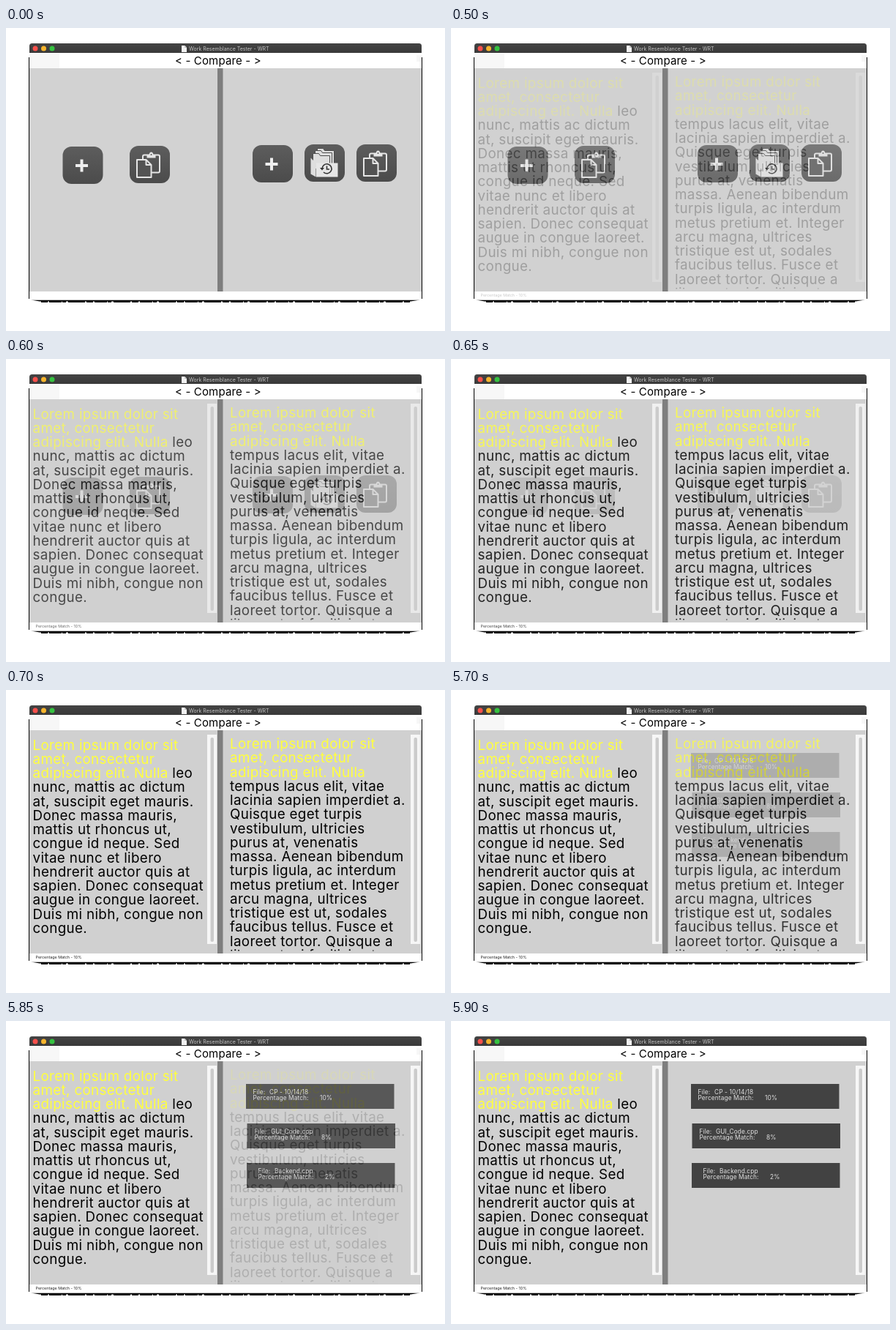
Animation, 600 px wide and 414 px high, one loop 8 s. Source, as an HTML page:

```html
<!DOCTYPE html>
<html lang="en">
<head>
<meta charset="utf-8">
<title>Compare</title>
<style>
html, body { margin: 0; width: 100%; height: 100%; overflow: hidden; background: #fff; }
svg { display: block; width: 600px; height: 414px; }
text { font-family: Inter, "Liberation Sans", Arial, sans-serif; white-space: pre; }
.body { font-size: 18.8px; letter-spacing: .35px; }
.card { font-size: 8.3px; letter-spacing: .12px; fill: #e2e2e2; }
.line { fill: none; stroke: #e6e6e6; stroke-width: 2; stroke-linejoin: round; }
.sheet { fill: #535353; }
</style>
</head>
<body>
<svg viewBox="0 0 600 414">
  <defs>
    <linearGradient id="button" x2="0" y2="1">
      <stop offset="0" stop-color="#5d5d5d"/>
      <stop offset="1" stop-color="#4b4b4b"/>
    </linearGradient>
    <linearGradient id="bar" x2="0" y2="1">
      <stop offset="0" stop-color="#444"/>
      <stop offset="1" stop-color="#393939"/>
    </linearGradient>
    <clipPath id="pane"><path d="M297 55H568V356.5H297Z"/></clipPath>
  </defs>

  <path d="M34 371.5H566L553 373.5H46Z"/>
  <path d="M48 374H552" stroke="#000" stroke-width="2" stroke-dasharray="9 2 17 1 5 3 23 2"/>
  <path d="M31.5 40V370M568.5 40V370" stroke="#000"/>
  <path d="M32 34H568V368Q568 371.5 564 371.5H36Q32 371.5 32 368Z" fill="#fff"/>
  <path d="M32 35H73V55H32ZM561 37H568V46H561Z" fill="#f7f7f7"/>
  <path d="M32 34V24.5Q32 21 35.5 21H564.5Q568 21 568 24.5V34Z" fill="url(#bar)"/>
  <circle cx="40" cy="28" r="3.5" fill="#f9504b"/>
  <circle cx="51.5" cy="28" r="3.5" fill="#f8b52c"/>
  <circle cx="63" cy="28" r="3.5" fill="#35c240"/>
  <path d="M240 24H244.5L247 26.5V33H240Z" fill="#f2f2f2"/>
  <path d="M244.5 24V26.5H247" fill="none" stroke="#999" stroke-width=".6"/>
  <text x="250" y="31" font-size="7" fill="#c4c4c4">Work Resemblance Tester - WRT</text>
  <text x="231" y="49.5" font-size="15" letter-spacing=".15">&lt; - Compare - &gt;</text>

  <g id="start"></g>
  <g id="texts"></g>
  <g id="matches"></g>
  <path d="M289 55H296.5V360H289Z" fill="#7e7e7e"/>
</svg>

<script>
const LOOP = 8000, STEP = 50, STEPS = 5;
const byId = id => document.getElementById(id);

const leftLines = `Lorem ipsum dolor sit|amet, consectetur|adipiscing elit. Nulla| leo
nunc, mattis ac dictum
at, suscipit eget mauris.
Donec massa mauris,
mattis ut rhoncus ut,
congue id neque. Sed
vitae nunc et libero
hendrerit auctor quis at
sapien. Donec consequat
augue in congue laoreet.
Duis mi nibh, congue non
congue.`;
const rightLines = `Lorem ipsum dolor sit|amet, consectetur|adipiscing elit. Nulla|
tempus lacus elit, vitae
lacinia sapien imperdiet a.
Quisque eget turpis
vestibulum, ultricies
purus at, venenatis
massa. Aenean bibendum
turpis ligula, ac interdum
metus pretium et. Integer
arcu magna, ultrices
tristique est ut, sodales
faucibus tellus. Fusce et
laoreet tortor. Quisque a
libero at mi facilisis at`;

const rect = (x, y, w, h, fill, rx = 0) =>
  `<rect x="${x}" y="${y}" width="${w}" height="${h}" rx="${rx}" fill="${fill}"/>`;

// The part before the last "|" is the highlighted match.
function paragraph(source, x, y) {
  const [head, ...rest] = source.split("\n");
  const marked = head.split("|"), tail = marked.pop();
  const rows = marked.map(s => `<tspan fill="#ffff3d">${s}</tspan>`);
  rows[rows.length - 1] += tail;
  return rows.concat(rest).map((row, i) =>
    `<text class="body" x="${x}" y="${y + i * 19.25}">${row}</text>`).join("");
}

const scrollbar = x =>
  rect(x, 61, 13, 286, "#f6f6f6") + rect(x + 4.5, 65, 4.5, 279, "#cbcbcb", 2);

const icons = {
  plus: `<path d="M-10 .5H7M-1.5 -8V9" stroke="#eee" stroke-width="4"/>`,
  paste: `<rect class="line" x="-9.5" y="-13" width="23" height="24" rx="2"/>
    <path d="M-4 -9V-13H-1Q-.5 -17 2 -17T5 -13H8V-9Z" fill="#e6e6e6"/>
    <circle cx="2" cy="-13.5" r="1" fill="#555"/>
    <path class="line sheet" d="M-17.5 -6.5H-5L2 .5V17.5H-17.5Z"/>
    <path class="line" d="M-5 -6.5V.5H2"/>`,
  history: `<g fill="#dedede" stroke="#4d4d4d">
      <path d="M-10 -20H-2L0 -17H13V8H-10Z"/>
      <path d="M-13 -17H-5L-3 -14H10V8H-13Z"/>
      <path d="M-16 -13H-8L-6 -10H7V8H-16Z"/>
    </g>
    <path d="M-19 -7L-12 0V19L-19 15Z" fill="#dedede"/>
    <path d="M-11.5 0H18V19H-11.5Z" fill="#e6e6e6"/>
    <path d="M-3.5 8A6.5 6.5 0 1 1 -1.5 12.5M3 4V8.5H6.5" fill="none" stroke="#333" stroke-width="1.6"/>
    <path d="M-6.5 6.5H-.5L-3.5 10Z" fill="#333"/>`
};
const button = (icon, x, y) => `<g transform="translate(${x} ${y})">`
  + rect(-27.5, -25.5, 55, 51, "url(#button)", 12) + icons[icon] + "</g>";

const card = (x, y, textX, file, match) => {
  const label = (dx, dy, s) => `<text class="card" x="${textX + dx}" y="${y + dy}">${s}</text>`;
  return rect(x, y, 202.5, 34, "#424242")
    + label(0, 14, "File:") + label(22.5, 14, file)
    + label(0, 22.3, "Percentage Match:") + label(91.5, 22.3, match);
};

byId("start").innerHTML = rect(32, 55, 536, 305, "#d2d2d2")
  + button("plus", 105, 187.5) + button("paste", 196.5, 186.5)
  + button("plus", 364.5, 185.5) + button("history", 435.5, 184.5)
  + button("paste", 506.5, 184.5);

byId("texts").innerHTML = rect(32, 55, 536, 305, "#d0d0d0")
  + paragraph(leftLines, 36.5, 81.5) + scrollbar(275)
  + `<g clip-path="url(#pane)">${paragraph(rightLines, 306, 80)}</g>` + scrollbar(553)
  + `<text x="40.5" y="367.2" font-size="5.4" fill="#222">Percentage Match - 10%</text>`;

byId("matches").innerHTML = rect(296, 55, 272, 305, "#d0d0d0") + scrollbar(553)
  + card(328, 86, 337.5, "CP - 10/14/18", "10%")
  + card(329.5, 140, 339.5, "GUI_Code.cpp", "8%")
  + card(329, 194, 344.5, "Backend.cpp", "2%");

// Dissolve in five discrete steps, slightly faster at first.
function dissolve(t, start) {
  const k = Math.floor((t - start) / STEP) + 1;
  const p = Math.min(Math.max(k / STEPS, 0), 1);
  return p * (1.25 - .25 * p);
}

function render(t) {
  byId("texts").setAttribute("opacity", dissolve(t, 500));
  byId("matches").setAttribute("opacity", dissolve(t, 5700));
}

function tick() {
  render(performance.now() % LOOP);
  requestAnimationFrame(tick);
}
tick();
</script>
</body>
</html>
```
